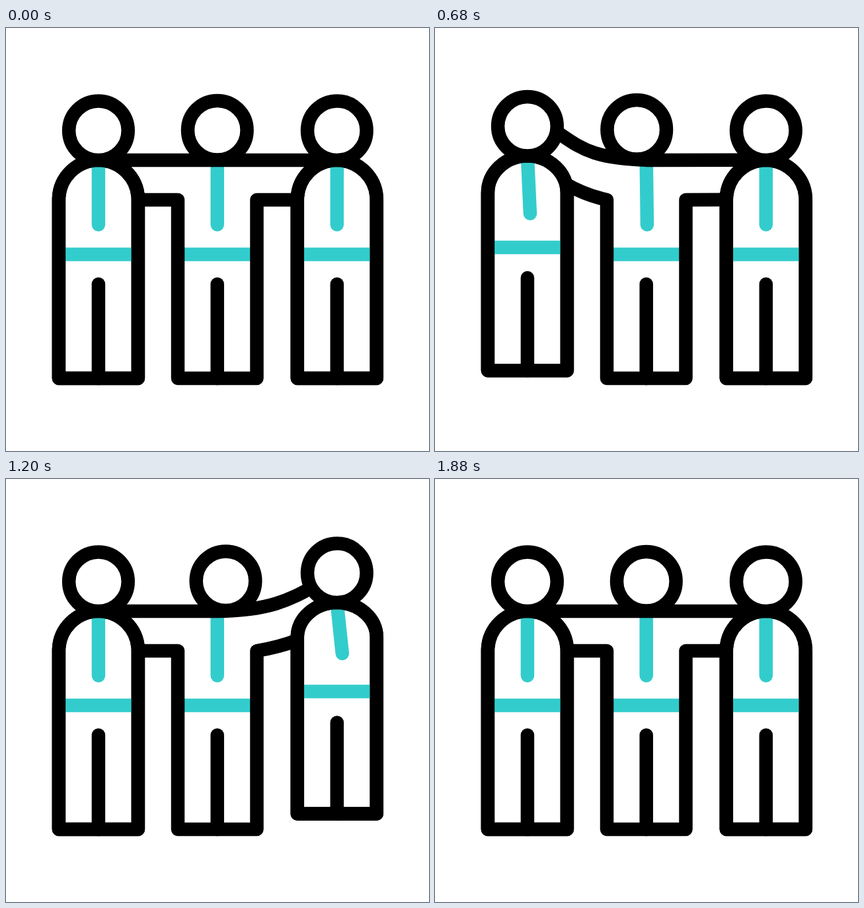
An HTML page that plays this animation: 640x640 px, repeating every 2000 ms.

```html
<!DOCTYPE html>
<html lang="en">
<head>
<meta charset="utf-8">
<title>Three friends</title>
<style>
  html, body { margin: 0; width: 100%; height: 100%; overflow: hidden; background: #fff; }
  svg { display: block; width: 100%; height: 100%; }
  path, circle { fill: #fff; stroke: #000; stroke-width: 20.5; stroke-linecap: round; stroke-linejoin: round; }
  .line { fill: none; }
  .accent { fill: none; stroke: #3cc; }
</style>
</head>
<body>
<svg id="stage" viewBox="0 0 640 640"></svg>
<script>
const LOOP = 2000, STEP = 40;
const stage = document.getElementById('stage');

function add(tag, className = '') {
  const el = document.createElementNS('http://www.w3.org/2000/svg', tag);
  el.setAttribute('class', className);
  return stage.appendChild(el);
}
const set = (el, attrs) => {
  for (const name in attrs) el.setAttribute(name, attrs[name]);
};
const mix = (a, b, k) => a + (b - a) * k;

// Smooth progress from 0 to 1 between two times
function ease(t, from, to) {
  const k = Math.min(1, Math.max(0, (t - from) / (to - from)));
  return k * k * (3 - 2 * k);
}
const pulse = (t, from, peak, to) => ease(t, from, peak) - ease(t, peak, to);

function makeMiddle() {
  const body = add('path');
  const belt = add('path', 'accent');
  const tie = add('path', 'accent');
  const outline = add('path', 'line');
  const leg = add('path', 'line');
  const topArm = add('path', 'line');
  const head = add('circle');
  set(body, { d: 'M260 260V530H380V260', stroke: 'none', style: 'stroke:none' });
  set(belt, { d: 'M270 342.5H370', style: 'stroke-linecap:butt' });
  set(leg, { d: 'M319.7 387.5V530' });

  return (left, right, swing) => {
    const low = (rest, raised, k) => mix(rest, raised, k);
    set(topArm, { d:
      `M180 ${low(200, 154, left)}C222 ${low(200, 182, left)} 235 ${low(200, 198, left)} 330 200` +
      `M320 200C400 ${low(200, 199, right)} 430 ${low(200, 182, right)} 465 ${low(200, 163, right)}` });
    set(outline, { d:
      `M195 ${low(260, 234, left)}Q225 ${low(260, 252, left)} 260 260V530H379.5V260` +
      `Q415 ${low(260, 254, right)} 440 ${low(260, 244, right)}` });
    set(tie, { d: `M319.7 200L${319.7 + 12 * swing} 297.5` });
    set(head, { cx: 319.8 - 14.8 * left + 12.7 * right, cy: 154.7 - left - 0.4 * right, r: 44.8 });
  };
}

function makeSide(x) {
  const body = add('path');
  const belt = add('path', 'accent');
  const tie = add('path', 'accent');
  const outline = add('path', 'line');
  const leg = add('path', 'line');
  const head = add('circle');
  set(belt, { style: 'stroke-linecap:butt' });

  return jump => {
    const y = (rest, high) => mix(rest, high, jump);
    const foot = y(530, 506.5), shoulder = y(260, 240);
    const d = `M${x - 60} ${foot}V${shoulder}A60 ${y(60, 53)} 0 0 1 ${x + 60} ${shoulder}V${foot}Z`;
    set(body, { d });
    set(outline, { d });
    set(belt, { d: `M${x - 50} ${y(342.5, 321.5)}h100` });
    set(tie, { d: `M${x} ${y(200, 188)}L${x + 8 * jump} ${y(297.5, 264)}` });
    set(leg, { d: `M${x} ${y(387.5, 368.5)}V${foot}` });
    set(head, { cx: x, cy: y(155.2, 142.2), r: 44.8 });
  };
}

const drawMiddle = makeMiddle();
const drawLeft = makeSide(139.9);
const drawRight = makeSide(500.8);

function draw(time) {
  const t = Math.floor((time % LOOP) / STEP) * STEP;
  const cross = ease(t, 660, 1020);
  drawMiddle(ease(t, 40, 360) - cross, cross - ease(t, 1480, 1880), pulse(t, 640, 840, 1040));
  drawLeft(pulse(t, 360, 560, 800));
  drawRight(pulse(t, 1000, 1200, 1440));
}

const start = performance.now();
function tick() {
  draw(performance.now() - start);
  requestAnimationFrame(tick);
}
tick();
</script>
</body>
</html>
```
